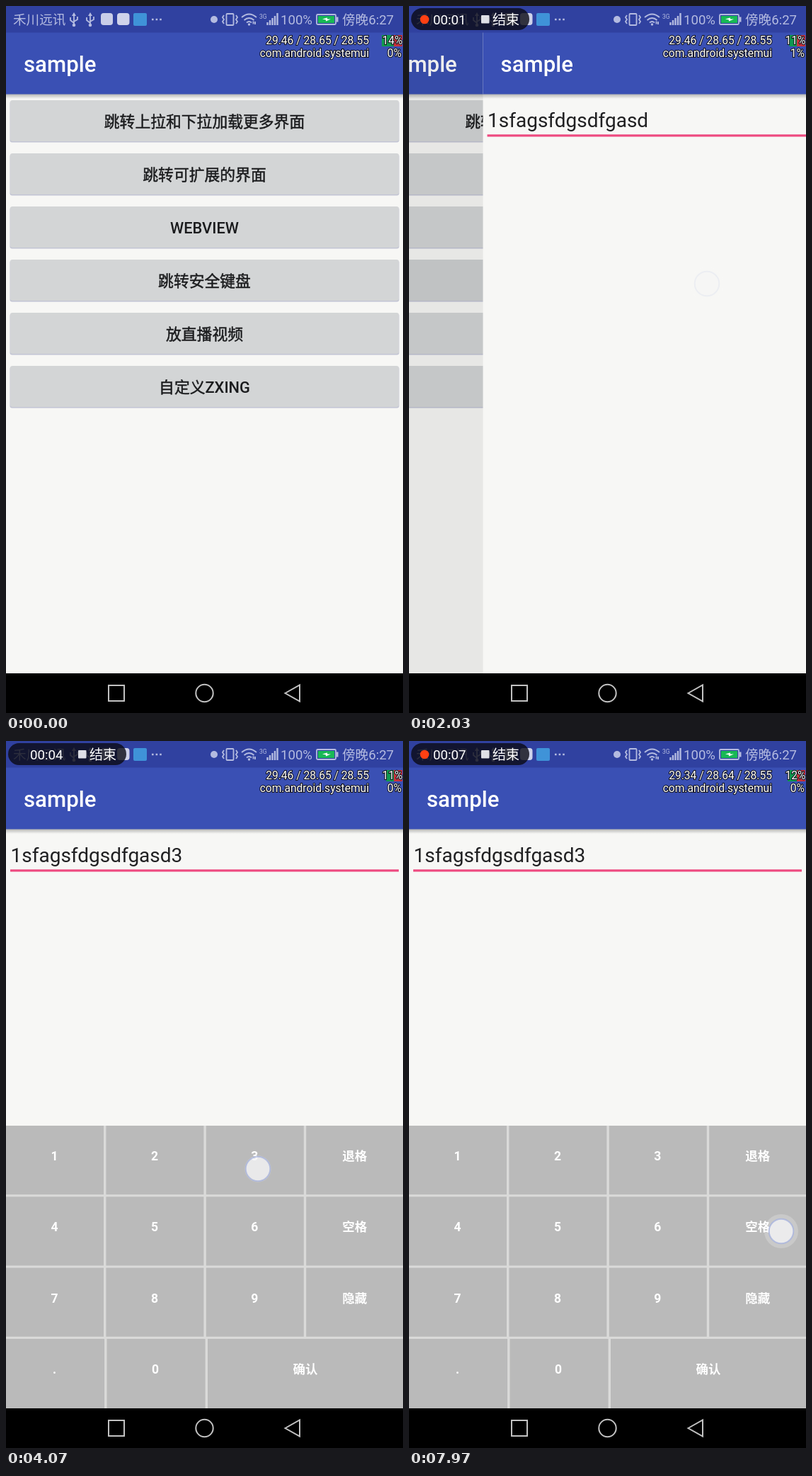
Write an HTML page that moves like this. It is 561x998 px and loops after 8000 ms.

```html
<!DOCTYPE html>
<html lang="zh-CN">
<head>
<meta charset="utf-8">
<title>sample</title>
<style>
  html, body { margin: 0; width: 100%; height: 100%; overflow: hidden; background: #f7f7f5; }
  svg { display: block; width: 100vw; height: 100vh; }
  text { font-family: Roboto, "Noto Sans CJK SC", "Noto Sans CJK", sans-serif; white-space: pre; }
  .mid { text-anchor: middle; }
  .end { text-anchor: end; }
  .title { font-size: 31.2px; font-weight: 500; fill: #fff; }
  .label { font-size: 21.8px; font-weight: 500; fill: #1a1b1d; }
  .han { stroke: #1a1b1d; stroke-width: .45px; }
  .key { font-size: 17.5px; font-weight: 700; fill: #fff; }
  .load { font-size: 15.6px; fill: #fff; stroke: #101018; stroke-width: 2px; paint-order: stroke; }
  .status { font-size: 18.6px; fill: #b4bbe0; }
  .line { fill: none; stroke: #b4bbe0; stroke-width: 1.8; }
</style>
</head>
<body>
<svg viewBox="0 0 561 998" preserveAspectRatio="none">
  <defs>
    <linearGradient id="shade" x2="0" y2="1">
      <stop stop-color="#000" stop-opacity=".28"/>
      <stop offset="1" stop-color="#000" stop-opacity="0"/>
    </linearGradient>
    <clipPath id="pressed"><rect x="6" y="358" width="549" height="58" rx="3"/></clipPath>
    <g id="frame">
      <rect y="37" width="561" height="961" fill="#f7f7f5"/>
      <rect y="124" width="561" height="7" fill="url(#shade)"/>
      <rect y="37" width="561" height="87.5" fill="#3a50b4"/>
      <text class="title" x="25" y="93">sample</text>
    </g>
    <g id="usb">
      <path class="line" d="M0-8V8M-5-3V1L0 5M5-4V0L0 3"/>
      <path d="M-3-5L0-10L3-5Z" fill="#b4bbe0"/>
      <circle cy="8" r="2.3" fill="#b4bbe0"/>
    </g>
  </defs>

  <g id="menu">
    <use href="#frame"/>
    <g id="buttons"></g>
    <g id="press" clip-path="url(#pressed)">
      <rect x="6" y="358" width="549" height="58" opacity=".025"/>
      <circle id="ripple" cx="421" cy="392" opacity=".05"/>
    </g>
    <rect id="dim" width="660" height="998"/>
  </g>

  <g id="form">
    <use href="#frame"/>
    <text id="field" x="6.5" y="170.5" font-size="28" fill="#202022"></text>
    <rect x="6" y="181.3" width="549" height="3.2" fill="#ee4a80"/>
  </g>

  <g id="keyboard"></g>

  <rect id="navBack" y="942" width="561" height="56"/>
  <g id="nav" fill="none" stroke-width="2">
    <rect x="145" y="959" width="22" height="22"/>
    <circle cx="280.5" cy="970" r="12.2"/>
    <path d="M394.5 970L415 958.5V981.5Z"/>
  </g>

  <rect width="561" height="37.5" fill="#3041a0"/>
  <g id="statusBar">
    <text class="status" x="10" y="26">禾川远讯</text>
    <use href="#usb" x="96" y="19"/>
    <use href="#usb" x="119" y="19"/>
    <rect x="134" y="10" width="17" height="17" rx="4" fill="#c9cee8"/>
    <rect x="157" y="10" width="17.5" height="17" rx="4" fill="#cfd3ea"/>
    <rect x="180" y="10" width="19" height="18" rx="2" fill="#3f93d8"/>
    <path d="M206 19h14" stroke="#b4bbe0" stroke-width="2.6" stroke-dasharray="2.6 3"/>
    <circle cx="294" cy="19" r="5" fill="#b4bbe0"/>
    <rect class="line" x="311.5" y="11" width="10" height="16" rx="1"/>
    <path class="line" d="M308 13l-2 3 2 3-2 3 2 3M325 13l2 3-2 3 2 3-2 3"/>
    <path class="line" d="M333 16q10.5-9 21 0M336.5 20q7-6 14 0M340 23.5q3.5-3 7 0"/>
    <circle cx="343.5" cy="26" r="1.7" fill="#b4bbe0"/>
    <path class="line" d="M349.5 25.5v-4M352 22v4"/>
    <text class="status" x="358" y="18" style="font-size:8.5px">3G</text>
    <path class="line" d="M369.5 27v-4M373 27v-7M376.5 27v-10M380 27v-13M383.5 27v-17" style="stroke-width:2.4"/>
    <text class="status" x="388" y="25.5">100%</text>
    <rect class="line" x="439" y="12" width="27" height="14" rx="1.5"/>
    <rect x="441" y="14" width="23" height="10" fill="#18b955"/>
    <rect x="467" y="15.5" width="2.5" height="7" fill="#b4bbe0"/>
    <path d="M447 18.5l7-2v2h5l-7 3v-2z" fill="#fff"/>
    <text class="status" x="475" y="26">傍晚6:27</text>
  </g>

  <g id="recorder">
    <rect x="3" y="3" width="167" height="31" rx="15.5" fill="#0a0b14" opacity=".8"/>
    <circle id="dot" cx="22" cy="19" r="6.3" fill="#ff4013"/>
    <text id="timer" x="34" y="26" font-size="18.7" fill="#fff"></text>
    <rect x="102" y="13" width="11.5" height="11.5" rx="1" fill="#dedfe6"/>
    <text x="118" y="26" font-size="19" fill="#fff">结束</text>
  </g>

  <rect id="loadGreen" y="41" height="16" fill="#109a50"/>
  <rect x="548" y="41" width="12" height="16" fill="#c6323c"/>
  <text id="loads" class="load end" x="513" y="54"></text>
  <text id="total" class="load end" x="560.5" y="54"></text>
  <text class="load end" x="513" y="72">com.android.systemui</text>
  <text id="share" class="load end" x="559" y="72"></text>

  <g id="touch">
    <circle id="halo" fill="#fff" opacity=".22"/>
    <circle r="17.3" fill="#f5f5f6" fill-opacity=".78" stroke="#a6b2de" stroke-opacity=".75" stroke-width="2"/>
  </g>
</svg>
<script>
const $ = id => document.getElementById(id);
const clamp = v => Math.max(0, Math.min(1, v));
const ramp = (t, start, length) => clamp((t - start) / length);
const easeOut = p => 1 - (1 - p) ** 2;
const set = (id, name, value) => $(id).setAttribute(name, value);
const move = (id, x, y) => set(id, 'transform', `translate(${x} ${y})`);
const show = (id, on) => set(id, 'visibility', on ? 'visible' : 'hidden');
const rect = (x, y, w, h, rest) => `<rect x="${x}" y="${y}" width="${w}" height="${h}" ${rest}/>`;
const label = (x, y, cls, text) => `<text class="mid ${cls}" x="${x}" y="${y}">${text}</text>`;
// Thickens Chinese characters to a medium weight
const medium = text => text.replace(/[^\x00-\x7f]+/g, '<tspan class="han">$&</tspan>');

const LOOP = 8000;
const KEY_TOP = 543, KEY_HEIGHT = 455, KEY_START = 3192, KEY_TIME = 300;

$('buttons').innerHTML =
  ['跳转上拉和下拉加载更多界面', '跳转可扩展的界面', 'WEBVIEW', '跳转安全键盘', '放直播视频', '自定义ZXING']
    .map((text, i) => {
      const y = 133 + i * 75;
      return rect(5.5, y + 1, 550, 58.5, 'rx="3" fill="#c2c4d4"') +
        rect(6, y, 549, 58, 'rx="3" fill="#d3d5d6"') + label(280.5, y + 38, 'label', medium(text));
    }).join('');

function buildKeyboard() {
  const rows = [['1', '2', '3', '退格'], ['4', '5', '6', '空格'], ['7', '8', '9', '隐藏'], ['.', '0', '确认']];
  let out = rect(0, 0, 561, KEY_HEIGHT, 'fill="#dadad9"');
  rows.forEach((row, r) => {
    const last = r === 3, pitch = last ? 142.5 : 141.4, y = r * 100.3;
    row.forEach((text, c) => {
      const x = c * pitch, wide = text === '确认';
      const w = wide ? 561 - x : pitch - 3.4;
      out += rect(x, y, w, last ? 155 : 97.2, 'fill="#bababa"') +
        label(wide ? 423 : x + 68.5, y + 49, 'key', text);
    });
  });
  $('keyboard').innerHTML = out;
}
buildKeyboard();

// Touches: start, end, x, y
const touches = [
  [1400, 2080, 421, 392], [2730, 3250, 439, 165],
  [3930, 4340, 356, 604], [4340, 4740, 222, 606], [4800, 5570, 238, 708],
  [5630, 6030, 505, 606], [6030, 6420, 505, 606], [7300, 8400, 526, 692]
];

// Field contents by the time they appear
const entries = [[0, ''], [4010, '3'], [4420, '32'], [4870, '325'], [5710, '32'], [6110, '3']];

// System load: time, averages, total, top process
const samples = [
  [0, '29.46 / 28.65 / 28.55', 14, 0], [530, '29.46 / 28.65 / 28.55', 11, 1],
  [3570, '29.46 / 28.65 / 28.55', 11, 0], [6600, '29.34 / 28.64 / 28.55', 13, 0],
  [7600, '29.34 / 28.64 / 28.55', 12, 0]
];
const latest = (list, t) => list.filter(item => item[0] <= t).pop();

function drawPages(t) {
  const p = easeOut(ramp(t, 1848, 322));
  move('menu', -90 * p * p, 0);
  move('form', 561 * (1 - p), 0);
  show('menu', p < 1);
  show('press', t >= 1400 && p < 1);
  set('ripple', 'r', Math.max(0, 63 * (t - 1400) / 500));
  set('dim', 'opacity', .08 * p);
  $('field').textContent = '1sfagsfdgsdfgasd' + latest(entries, t)[1];
}

function drawKeyboard(t) {
  const left = 1 - easeOut(ramp(t, KEY_START, KEY_TIME));
  show('keyboard', t > KEY_START);
  move('keyboard', 0, KEY_TOP + KEY_HEIGHT * left);
  const clear = Math.min(ramp(t, KEY_START, 40), 1 - ramp(t, KEY_START + KEY_TIME, 40));
  set('navBack', 'opacity', 1 - clear);
  set('nav', 'stroke', clear > .5 ? '#a9a9af' : '#c2c2c2');
}

function drawStatus(t) {
  const clock = Math.max(0, t - 40);
  set('recorder', 'opacity', ramp(t, 30, 170));
  $('timer').textContent = '00:0' + Math.floor(clock / 1000);
  show('dot', clock % 1000 >= 430);
  const [, loads, total, share] = latest(samples, t);
  const x = 560 - 29 * total / 14;
  $('loads').textContent = loads;
  $('total').textContent = total + '%';
  $('share').textContent = share + '%';
  set('loadGreen', 'x', x);
  set('loadGreen', 'width', 548 - x);
}

function drawTouch(t) {
  const touch = touches.find(([start, end]) => t >= start && t < end);
  show('touch', touch);
  if (!touch) return;
  const [start, end, x, y] = touch;
  move('touch', x, y);
  set('touch', 'opacity', Math.min(ramp(t, start, 100), (end - t) / 280, 1));
  set('halo', 'r', 17 + 7 * ramp(t, start, 600));
}

function draw(t) {
  drawPages(t);
  drawKeyboard(t);
  drawStatus(t);
  drawTouch(t);
}

const began = performance.now();
function tick() {
  draw((performance.now() - began) % LOOP);
  requestAnimationFrame(tick);
}
draw(0);
requestAnimationFrame(tick);
</script>
</body>
</html>
```
